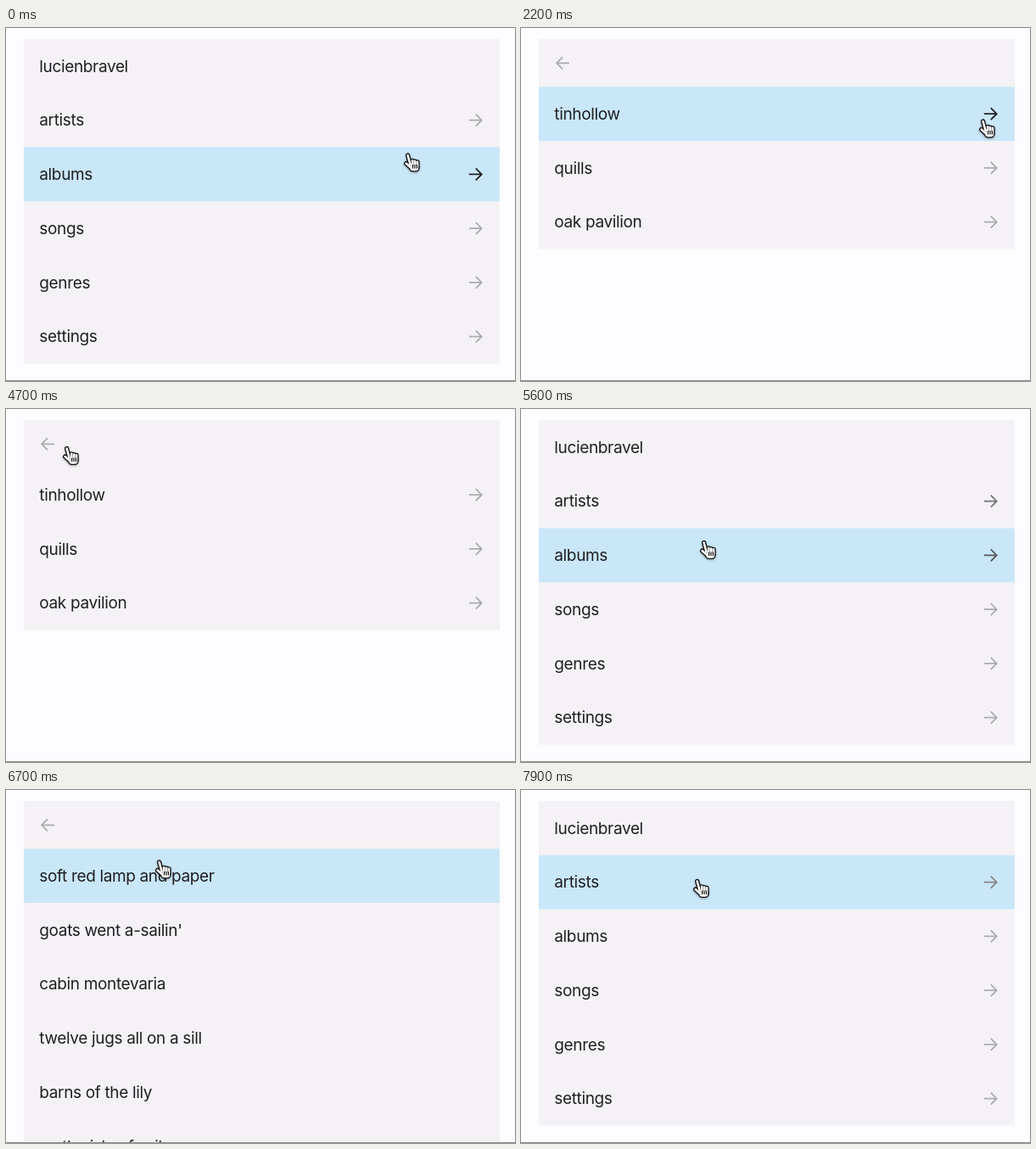
An HTML page with a canvas that plays this animation: 600 by 416 pixels, repeating every 8 s.

```html
<!DOCTYPE html>
<html lang="en">
<head>
<meta charset="utf-8">
<title>Music menu</title>
<style>
  html, body { margin: 0; width: 100%; height: 100%; overflow: hidden; background: #fdfcfe; }
  canvas { display: block; width: 600px; height: 416px; }
</style>
</head>
<body>
<canvas id="stage"></canvas>
<script>
const canvas = document.getElementById('stage');
const ctx = canvas.getContext('2d');
const W = 600, H = 416, LOOP = 8000, STEP = 100;
const LEFT = 21, RIGHT = 582, TOP = 13, BACK_SIZE = 56.3, ROW = 63.75;
const FADE = 200, HOVER_LAG = 60;
const COLORS = { page: '#fdfcfe', panel: '#f4f2f5', hover: '#c9e7f8', text: '#1f1f22', line: '#8c8b8d' };

const scale = window.devicePixelRatio || 1;
canvas.width = W * scale;
canvas.height = H * scale;

const home = { title: 'lucienbravel', rows: ['artists', 'albums', 'songs', 'genres', 'settings'], arrows: true };
const artists = { rows: ['tinhollow', 'quills', 'oak pavilion'], arrows: true };
const artistAlbums = { rows: ['pack our lamps'], arrows: true };
const albums = { rows: ['pack our lamps', 'cabin montevaria', 'copper almanac'], arrows: true };
const songs = {
  rows: ['soft red lamp and paper', "goats went a-sailin'", 'cabin montevaria',
    'twelve jugs all on a sill', 'barns of the lily', 'on the isle of sails'],
  arrows: false
};

// The pointer glides to x, y by time "at" (or rests there), then may open a page.
const back = { x: 62, y: 44 };
const visits = [
  { at: 0, x: 474, y: 148, open: home },
  { at: 450, x: 260, y: 56 },
  { at: 900, x: 72, y: 100 },
  { at: 1300, open: artists },
  { at: 1650, x: 50, y: 100 },
  { at: 2000, x: 545, y: 108 },
  { at: 2700, open: artistAlbums },
  { at: 3400, x: 76, y: 48 },
  { at: 3900, open: artists },
  { at: 4650 },
  { at: 4700, x: 72, y: 44.5 },
  { at: 5200, ...back, open: home },
  { at: 5550, x: 216, y: 155.5 },
  { at: 5600 },
  { at: 5750, x: 200, y: 160, open: albums },
  { at: 6080, ...back, open: home },
  { at: 6450, x: 200, y: 232, open: songs },
  { at: 6700, x: 181, y: 83 },
  { at: 7200, ...back },
  { at: 7400, open: home },
  { at: 7720, x: 150, y: 50 },
  { at: LOOP, x: 216.5, y: 113.6 }
];
visits.forEach((visit, i) => {
  const { x, y } = visits[i - 1] || visit;
  visits[i] = { x, y, ...visit };
});

const easeOut = k => 1 - (1 - k) ** 2;

function pointerAt(t) {
  const i = visits.findIndex(visit => visit.at > t);
  const from = visits[i - 1], to = visits[i];
  const k = easeOut((t - from.at) / (to.at - from.at));
  return { x: from.x + (to.x - from.x) * k, y: from.y + (to.y - from.y) * k };
}

const viewAt = t => visits.filter(visit => visit.open && visit.at <= t).pop();
const rowsTop = page => TOP + (page.title ? ROW : BACK_SIZE);

// Item under the pointer: row index, -1 for the back link, null for none.
function itemAt(page, { x, y }) {
  if (x < LEFT || x > RIGHT || y < TOP) return null;
  const top = rowsTop(page);
  if (y < top) return !page.title && x < 75 ? -1 : null;
  const index = Math.floor((y - top) / ROW);
  return index < page.rows.length ? index : null;
}

function hoverAt(t) {
  const seen = Math.max(0, t - HOVER_LAG), view = viewAt(t);
  return viewAt(seen) === view ? itemAt(view.open, pointerAt(seen)) : null;
}

// Share of the last FADE milliseconds spent on an item.
function darkness(t, item) {
  const samples = 40;
  const view = viewAt(t);
  let hits = 0;
  for (let i = 0; i < samples; i++) {
    const past = Math.max(0, t - i * FADE / samples);
    if (viewAt(past) === view && hoverAt(past) === item) hits++;
  }
  return hits / samples;
}

function drawArrow(x, y, dir, level) {
  const tone = Math.round(172 - 138 * level);
  ctx.strokeStyle = `rgb(${tone},${tone},${tone + 2})`;
  ctx.lineWidth = 1.8;
  ctx.beginPath();
  ctx.moveTo(x - 8 * dir, y);
  ctx.lineTo(x + 6.6 * dir, y);
  ctx.moveTo(x, y - 7);
  ctx.lineTo(x + 6.9 * dir, y);
  ctx.lineTo(x, y + 7);
  ctx.stroke();
}

function drawLabel(text, middle) {
  ctx.fillStyle = COLORS.text;
  ctx.fillText(text, 39.3, middle + 6.8);
}

function fillBox(color, x, y, w, h) {
  ctx.fillStyle = color;
  ctx.fillRect(x, y, w, h);
}

function drawPage(page, t) {
  const top = rowsTop(page), hover = hoverAt(t);
  fillBox(COLORS.panel, LEFT, TOP, RIGHT - LEFT, top - TOP + page.rows.length * ROW);
  if (page.title) {
    drawLabel(page.title, TOP + ROW / 2);
  } else {
    if (hover === -1) fillBox(COLORS.hover, LEFT, TOP, BACK_SIZE, BACK_SIZE);
    drawArrow(49, 41.3, -1, darkness(t, -1));
  }
  page.rows.forEach((text, i) => {
    const y = top + i * ROW, middle = y + ROW / 2;
    if (hover === i) fillBox(COLORS.hover, LEFT, y, RIGHT - LEFT, ROW);
    drawLabel(text, middle);
    if (page.arrows) drawArrow(553.8, middle, 1, darkness(t, i));
  });
}

function stroke(color, width, x0, y0, x1, y1) {
  ctx.strokeStyle = color;
  ctx.lineWidth = width;
  ctx.beginPath();
  ctx.moveTo(x0, y0);
  ctx.lineTo(x1, y1);
  ctx.stroke();
}

// Round strokes, first wide and black, then narrow and white.
function drawHand() {
  ctx.lineCap = 'round';
  for (const [color, extra] of [['#111', 2.6], ['#fff', 0]]) {
    stroke(color, 2.6 + extra, 4.6, 3, 7.6, 14);
    stroke(color, 2.6 + extra, 2.6, 12.6, 7.6, 17);
    for (let i = 0; i < 3; i++) stroke(color, 2.7 + extra, 10.2 + 2.9 * i, 9.3 + 0.8 * i, 10.2 + 2.9 * i, 16);
    stroke(color, 6.4 + extra, 10.6, 18, 14, 18);
    ctx.shadowColor = 'transparent';
  }
  ctx.lineCap = 'butt';
  for (let i = 0; i < 3; i++) stroke('#111', 1.2, 10.6 + 2.4 * i, 14, 10.6 + 2.4 * i, 18.6);
}

const arrowShape = new Path2D('M0 0V18L4.2 14.2L7.2 21.3L10.2 20L7.2 13.1H12.8Z');

function drawPointer(page, point) {
  const hand = itemAt(page, point) !== null;
  ctx.save();
  ctx.translate(point.x - (hand ? 5 : 0), point.y - (hand ? 1 : 0));
  ctx.shadowColor = 'rgba(0,0,0,.35)';
  ctx.shadowBlur = 2.5 * scale;
  ctx.shadowOffsetY = scale;
  if (hand) {
    drawHand();
  } else {
    ctx.strokeStyle = '#fff';
    ctx.lineWidth = 2.6;
    ctx.stroke(arrowShape);
    ctx.shadowColor = 'transparent';
    ctx.fillStyle = '#0b0b0b';
    ctx.fill(arrowShape);
  }
  ctx.restore();
}

function draw(now) {
  const t = Math.floor((now % LOOP) / STEP) * STEP;
  const page = viewAt(t).open;
  ctx.setTransform(scale, 0, 0, scale, 0, 0);
  ctx.font = '19px Inter, "Liberation Sans", sans-serif';
  ctx.letterSpacing = '-0.35px';
  fillBox(COLORS.page, 0, 0, W, H);
  drawPage(page, t);
  fillBox(COLORS.line, 0, 415, W, 1);
  drawPointer(page, pointerAt(t));
}

const began = performance.now();
function tick() {
  draw(performance.now() - began);
  requestAnimationFrame(tick);
}
tick();
</script>
</body>
</html>
```
